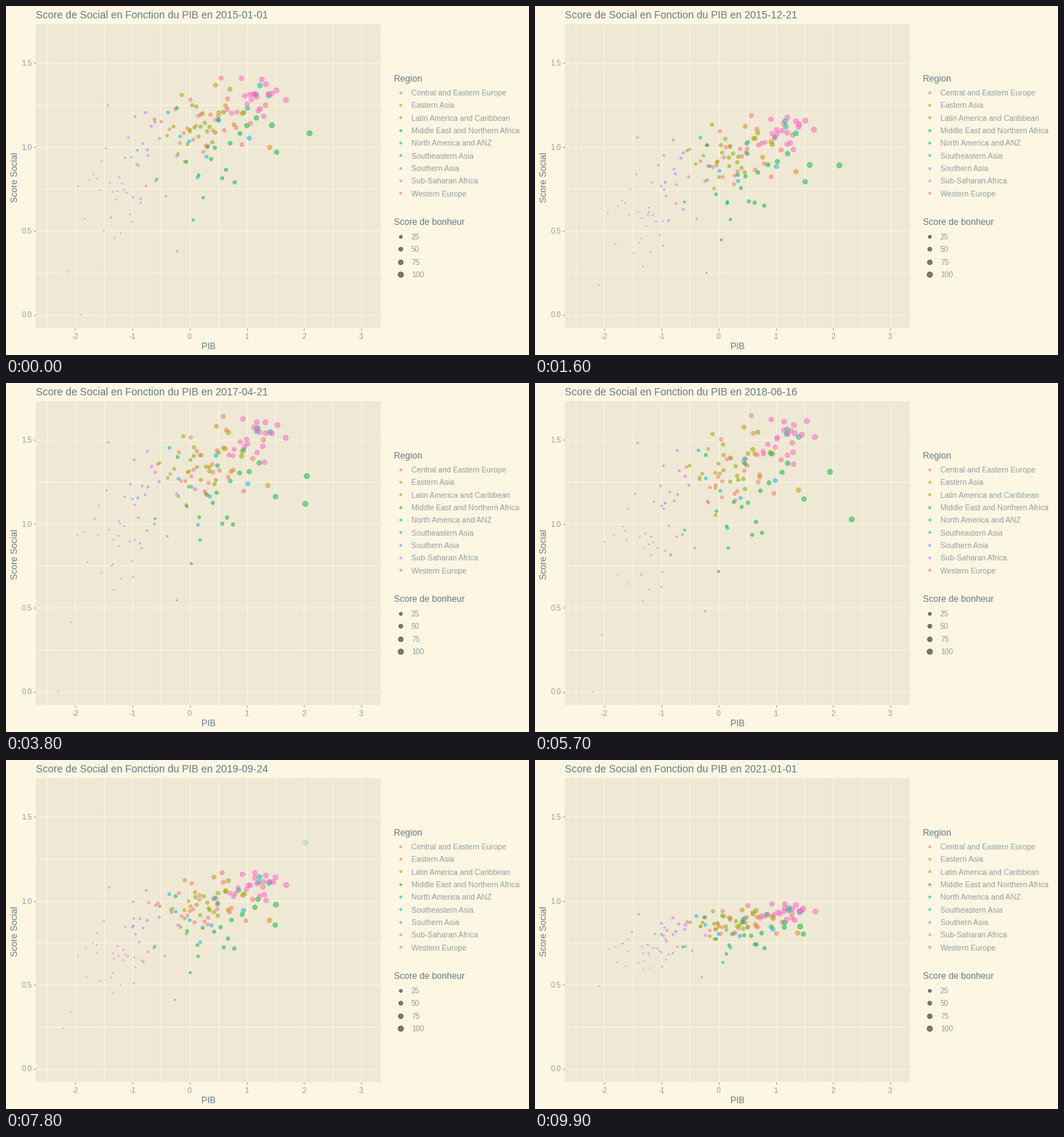
These frames come from a looping animation (720x480 px, 10000 ms). A matplotlib script:

```python
import numpy as np
import matplotlib.pyplot as plt
from matplotlib.animation import FuncAnimation
from matplotlib.colors import to_rgba_array
from matplotlib.patches import Rectangle

W, H, DPI = 720, 480, 100
PT = 72 / DPI                      # points per pixel
FRAMES, DAYS = 100, 2192
KEYS = [0, 17, 33, 50, 67, 83, 99]
YEARS = len(KEYS)
CREAM, PANEL, GREY, SLATE = "#fdf6e3", "#eee8d5", "#93a1a1", "#657b83"
LEFT, RIGHT, TOP, BOTTOM, FLOOR = 41, 516, 25, 443, 424.5

# Colour, number of points, then centre and spread of x and y in pixels.
REGIONS = {
    "Central and Eastern Europe": ("#F8766D", 27, (275, 45), (165, 32)),
    "Eastern Asia": ("#D39200", 6, (308, 30), (155, 25)),
    "Latin America and Caribbean": ("#93AA00", 23, (265, 33), (163, 25)),
    "Middle East and Northern Africa": ("#00BA38", 18, (290, 45), (208, 40)),
    "North America and ANZ": ("#00C19F", 4, (347, 8), (123, 5)),
    "Southeastern Asia": ("#00B9E3", 8, (258, 42), (185, 28)),
    "Southern Asia": ("#619CFF", 6, (190, 25), (270, 42)),
    "Sub-Saharan Africa": ("#DB72FB", 39, (160, 41), (235, 58)),
    "Western Europe": ("#FF61C3", 19, (345, 22), (127, 17)),
}

# Each year maps the first year's heights: base + stretch * (y - 120).
BASE = np.array([120, 170, 68, 70, 68, 212, 206])
STRETCH = np.array([1, 0.9, 1.05, 1.1, 1.2, 0.55, 0.42])
TILT = -0.25                       # richer points sit higher

rng = np.random.default_rng(12)
tracks, shown, hues = [], [], []


def spread(n, centre, scale):
    """Bell-shaped values in random order."""
    return centre + scale * rng.permutation(
        np.arctanh(np.linspace(-0.95, 0.95, n)))


def add_region(color, n, x_spec, y_spec):
    xs = spread(n, *x_spec)
    ys = spread(n, *y_spec) + TILT * (xs - x_spec[0])
    for x, y in zip(xs, ys):
        drift = np.r_[0, rng.normal(0, 2, YEARS - 1).cumsum()]
        level = BASE + STRETCH * (y - 120 + rng.normal(0, 4, YEARS))
        tracks.append(np.column_stack([x + drift, np.clip(level, 45, FLOOR)]))
        shown.append(np.ones(YEARS))
        hues.append(color)


def add_track(color, path, first=0):
    """One outlier with its own path; it fades in years without a value."""
    year = np.arange(YEARS) - first
    tracks.append(np.array(path, float)[np.clip(year, 0, len(path) - 1)])
    shown.append(1.0 * ((year >= 0) & (year < len(path))))
    hues.append(color)


for spec in REGIONS.values():
    add_region(*spec)

GULF, AFRICA = "#00BA38", "#DB72FB"
add_track(GULF, [(366, 164), (379, 222), (397, 133), (448, 246),
                 (419, 104), (350, 242), (365, 229)])
add_track(GULF, [(418, 175), (419, 222), (419, 128), (402, 128), (412, 114)])
add_track(AFRICA, [(103, FLOOR)])
add_track(AFRICA, [(69, FLOOR), (79, FLOOR), (79, FLOOR), (78, 344)], first=2)

tracks, shown = np.array(tracks), np.array(shown)
rgba = to_rgba_array(hues)
mean_x, first_y = tracks[:, :, 0].mean(axis=1), tracks[:, 0, 1]
radii = np.clip(1.95 + 0.0095 * (mean_x - 253) + 0.005 * (219 - first_y),
                0.7, 3.6)

plt.rcParams["font.family"] = "Liberation Sans"
fig = plt.figure(figsize=(W / DPI, H / DPI), dpi=DPI, facecolor=CREAM)
ax = fig.add_axes([0, 0, 1, 1])
ax.set(xlim=(0, W), ylim=(H, 0))
ax.axis("off")


def text(x, y, label, size, color=GREY, **kw):
    kw.setdefault("va", "baseline")
    return ax.text(x, y, label, fontsize=size * PT, color=color, **kw)


def line(xs, ys, color):
    ax.plot(xs, ys, color=color, lw=PT, zorder=1, solid_capstyle="butt")


def dots(x, y, r, color):
    return ax.scatter(x, y, s=(2 * np.asarray(r) * PT) ** 2, c=color,
                      alpha=0.5, edgecolors=color, linewidths=0.9 * PT,
                      zorder=3)


def px(v):
    return 252.8 + 78.7 * v


def py(v):
    return FLOOR - 230.7 * v


ax.add_patch(Rectangle((LEFT, TOP), RIGHT - LEFT, BOTTOM - TOP,
                       fc=PANEL, ec="none", zorder=0))
for v in np.arange(-2.5, 3.1, 0.5):
    line([px(v)] * 2, [TOP, BOTTOM], CREAM)
    if v == round(v):
        line([px(v)] * 2, [BOTTOM, BOTTOM + 3], GREY)
        text(px(v), 457.5, f"{v:.0f}", 10.4, ha="center")
for v in np.arange(0, 1.6, 0.25):
    line([LEFT, RIGHT], [py(v)] * 2, CREAM)
    if v % 0.5 == 0:
        line([LEFT - 3, LEFT], [py(v)] * 2, GREY)
        text(36, py(v) + 4, f"{v:.1f}", 10.4, ha="right")

title = text(41, 17, "", 14.15, SLATE)
text(278.5, 472, "PIB", 12.2, SLATE, ha="center")
text(13.5, 235, "Score Social", 12.2, SLATE, rotation=90,
     ha="center", va="center")

text(534, 104, "Region", 12.3, SLATE)
for i, (name, spec) in enumerate(REGIONS.items()):
    y = 119.3 + 17.35 * i
    dots([543.3], [y - 0.8], [1.6], spec[0])
    text(558, y + 3.7, name, 10.5)

text(534, 301, "Score de bonheur", 12.3, SLATE)
for i in range(4):
    y = 316.8 + 17.35 * i
    dots([543.3], [y], [0.4 + 1.65 * np.sqrt(i + 1)], "black")
    text(558, y + 4, str(25 * (i + 1)), 10.5)

points = dots(*tracks[:, 0].T, radii, hues)
points.set_alpha(None)


def draw(frame):
    k = min(np.searchsorted(KEYS, frame, "right") - 1, YEARS - 2)
    t = (frame - KEYS[k]) / (KEYS[k + 1] - KEYS[k])
    before, after = shown[:, k], shown[:, k + 1]
    # Points that enter or leave fade in place.
    start = np.where(before[:, None] > 0, tracks[:, k], tracks[:, k + 1])
    points.set_offsets(start + (tracks[:, k + 1] - start) * t)
    rgba[:, 3] = 0.5 * (before + (after - before) * t)
    points.set_facecolor(rgba)
    points.set_edgecolor(rgba)
    day = np.datetime64("2015-01-01") + frame * DAYS // (FRAMES - 1)
    title.set_text(f"Score de Social en Fonction du PIB en {day}")
    return points, title


anim = FuncAnimation(fig, draw, frames=FRAMES, interval=100, repeat=True,
                     repeat_delay=0)
plt.show()
```
